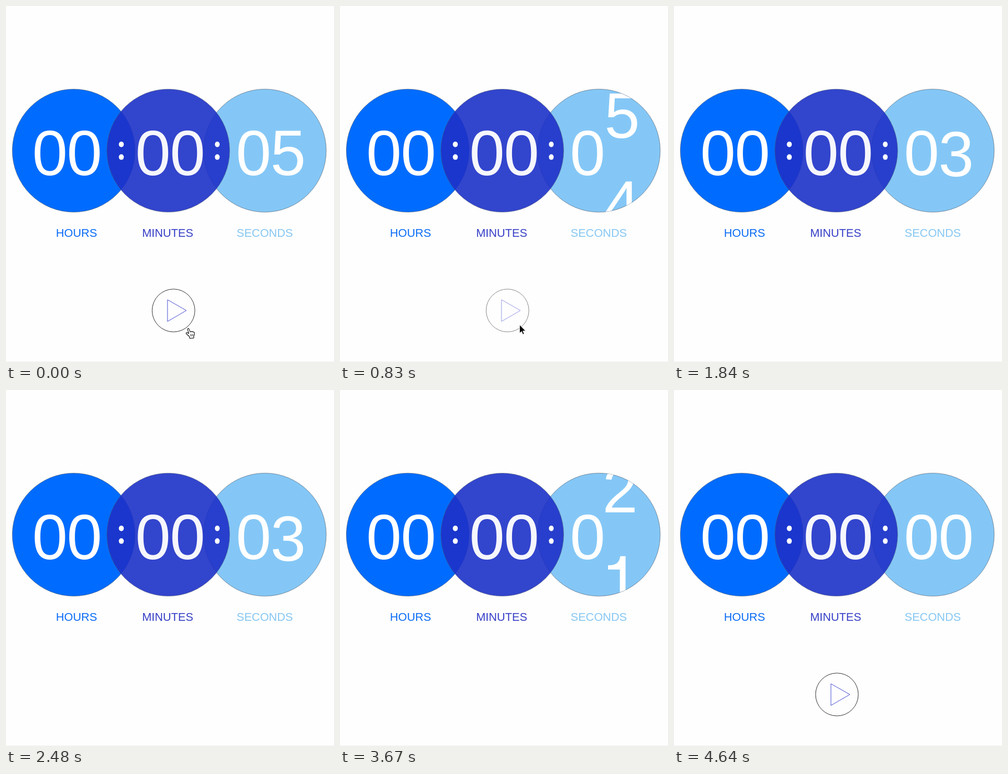
An HTML page for the animation above (4920 ms loop, 591 px wide and 640 px high).

```html
<!DOCTYPE html>
<html lang="en">
<head>
<meta charset="utf-8">
<title>Countdown</title>
<style>
  html, body { margin: 0; width: 100%; height: 100%; overflow: hidden; background: #fefefe; }
  svg { display: block; width: 591px; height: 640px; }
  text { font-family: "Liberation Sans", Arial, sans-serif; text-anchor: middle; }
  .num { font-size: 114.5px; fill: #fff; }
  .label { font-size: 20.5px; }
  .disc { stroke: #4a5566; stroke-width: .7; stroke-opacity: .85; }
</style>
</head>
<body>
<svg viewBox="0 0 591 640">
  <defs><clipPath id="face"><circle cx="466.4" cy="260" r="110.5"/></clipPath></defs>
  <rect width="591" height="640" fill="#fefefe"/>
  <rect y="639" width="591" height="1" fill="#f3f3f3"/>

  <circle class="disc" cx="122" cy="260" r="110.6" fill="#006cff"/>
  <circle class="disc" cx="466.4" cy="260" r="110.6" fill="#84c7f6"/>
  <circle class="disc" cx="292.4" cy="260" r="110.6" fill="#1d31c8" opacity=".9"/>

  <g class="num">
    <text x="79" y="303.5">0</text><text x="141.3" y="303.5">0</text>
    <text x="264.8" y="303.5" fill="#f6f6fc">0</text><text x="327.2" y="303.5" fill="#f6f6fc">0</text>
    <text x="446" y="303.5">0</text>
  </g>
  <g clip-path="url(#face)"><g id="reel" class="num"></g></g>

  <g fill="#fff">
    <ellipse cx="207.8" cy="248.8" rx="4.5" ry="5"/><ellipse cx="207.8" cy="271.6" rx="4.5" ry="5"/>
    <ellipse cx="380.7" cy="248.8" rx="4.3" ry="5"/><ellipse cx="380.7" cy="271.6" rx="4.3" ry="5"/>
  </g>

  <g class="label">
    <text x="127.1" y="414.5" fill="#0a6cf5">HOURS</text>
    <text x="291.3" y="414.5" fill="#363fc6">MINUTES</text>
    <text x="466.2" y="414.5" fill="#86c7f3">SECONDS</text>
  </g>

  <g id="play" fill="none">
    <circle r="38.5" stroke="#222" stroke-width=".9"/>
    <path d="M-10.8 -19.3V19.7L23.2 0Z" stroke="#3a40d0" stroke-width=".9"/>
  </g>

  <g id="hand" transform="translate(324 578.5)" stroke="#111" stroke-width="1.1" stroke-linejoin="round">
    <path fill="#fff" d="M6.3 15.6C4.6 14 3.2 12.6 1.2 11.2C-.4 9.8 1.2 8 3 8.9L5.4 10.2L3.2 3.4C2.6 1 5 .3 5.9 2.4L8 7.6C8.6 6.2 10.3 6.2 10.9 7.4C11.7 6.2 13.1 6.6 13.5 7.9C14.6 7.2 15.4 8.2 15.5 9.6C15.8 12 15.5 13.6 14.2 15.6V18.4L7.2 19Z"/>
    <path fill="none" stroke-width=".8" d="M8.4 11.4L9 15.4M10.6 11.2L11 15.2M12.8 11L13 15"/>
  </g>
  <path id="arrow" fill="#000" stroke="#fff" stroke-width="1" d="M0 0V15.4L3.6 12.1L5.9 17.5L8.4 16.4L6.1 11.2H11Z"/>
</svg>
<script>
const LOOP = 4920, GAP = 158, BASE = 303.5;
const $ = id => document.getElementById(id);
const clamp = v => Math.min(1, Math.max(0, v));

// Each roll: first step, step length, step count, easing start, easing duration
const rolls = [
  [620, 70, 8, 590, 502],
  [1490, 85, 7, 1467, 520],
  [2480, 80, 7, 2463, 490],
  [3390, 70, 8, 3452, 430],
  [4280, 60, 7, 4260, 380]
];

const digits = [5, 4, 3, 2, 1, 0].map(n => {
  const one = n === 1;
  const el = document.createElementNS("http://www.w3.org/2000/svg", one ? "path" : "text");
  // A plain "1" without a foot
  if (one) el.setAttribute("d", "M-25.3 -56V-63.5C-10 -64 -5.5 -68 -3.3 -80H6.2V0H-4V-56Z");
  else el.textContent = n;
  $("reel").append(el);
  return el;
});

function bez(s, a, b) {
  const r = 1 - s;
  return 3 * r * r * s * a + 3 * r * s * s * b + s * s * s;
}

// Symmetric ease in and out with a small pull back at both ends
function backEase(u) {
  if (u <= 0) return 0;
  if (u >= 1) return 1;
  let lo = 0, hi = 1;
  for (let i = 0; i < 24; i++) {
    const mid = (lo + hi) / 2;
    if (bez(mid, .6, .4) < u) lo = mid; else hi = mid;
  }
  return bez(lo, -.4, 1.4);
}

function progress(t, [from, step, count, start, span]) {
  if (t < from) return 0;
  const k = Math.floor((t - from) / step);
  return k >= count - 1 ? 1 : backEase((from + k * step - start) / span);
}

const place = (el, x, y) => el.setAttribute("transform", `translate(${x} ${y})`);
const show = (el, on) => el.setAttribute("visibility", on ? "visible" : "hidden");

function draw(t) {
  const parts = rolls.map(r => progress(t, r));
  const pos = parts.reduce((a, b) => a + b, 0);

  digits.forEach((el, i) => {
    const two = i === 3;
    const x = 508.3 - (two ? 7 * clamp(pos - 3) : 0);
    place(el, x, BASE - (two ? 1 : 0) + (i - pos) * GAP);
    show(el, Math.abs(i - pos) < 1.2);
  });

  const ending = t >= rolls[4][0];
  place($("play"), ending ? 293.6 : 301.8, 547.4);
  $("play").setAttribute("opacity", clamp(ending ? parts[4] : 1 - parts[0]));

  show($("hand"), t < 690);
  show($("arrow"), t >= 690 && t < 1110);
  const held = 620 + Math.floor((t - 620) / 70) * 70;
  const exit = clamp((held - 830) / 280);
  place($("arrow"), 323.6 + 6 * exit, 573 + 68 * exit * exit);
}

const t0 = performance.now();
function tick() {
  draw((performance.now() - t0) % LOOP);
  requestAnimationFrame(tick);
}
draw(0);
requestAnimationFrame(tick);
</script>
</body>
</html>
```
